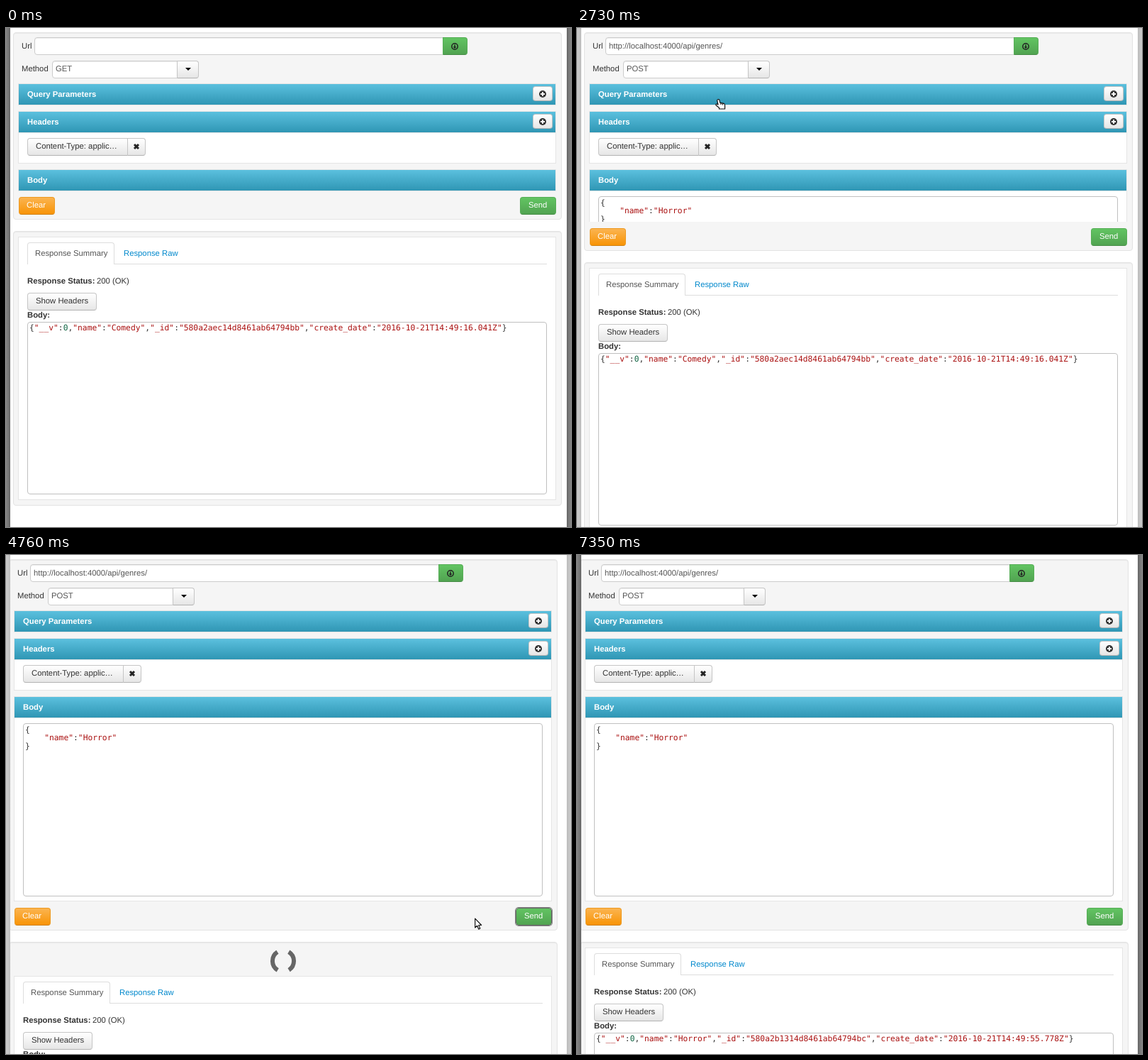
An HTML page for the animation above (7.49 s loop, 797 by 703 pixels).

```html
<!DOCTYPE html>
<html lang="en">
<head>
<meta charset="utf-8">
<title>REST client</title>
<style>
html, body { margin: 0; width: 100%; height: 100%; overflow: hidden; background: #fff; }
#stage { position: relative; width: 797px; height: 703px; overflow: hidden;
  font: 11.3px/20px "Liberation Sans", Arial, sans-serif; color: #333; text-rendering: geometricPrecision; }
#stage * { box-sizing: border-box; }
#stage div, #stage svg { position: absolute; white-space: pre; }
#stage svg { overflow: visible; }
.side { background: linear-gradient(90deg, #ccc, #bdbdbd); }
.side.right { transform: scaleX(-1); }
.dark .side { background: linear-gradient(90deg, #858585, #686868); }
.panel { background: #f5f5f5; border: 1px solid #e3e3e3; border-radius: 4px; box-shadow: inset 0 1px 1px rgba(0,0,0,.05); }
.card { background: #fff; border: 1px solid #e5e5e5; }
.bar { background: linear-gradient(#5bc0de, #2f96b4); }
.field { background: #fff; border: 1px solid #ccc; border-radius: 4px 0 0 4px; box-shadow: inset 0 1px 1px rgba(0,0,0,.075); }
.field.focus { border-color: rgba(82,168,236,.8); box-shadow: inset 0 1px 1px rgba(0,0,0,.075), 0 0 6px rgba(82,168,236,.6); }
.code { background: #fff; border: 1px solid #c0c0c0; border-radius: 4px; }
.btn { background: linear-gradient(#fff, #e6e6e6); border: 1px solid #c5c5c5; border-bottom-color: #b3b3b3; border-radius: 4px; }
.green { background: linear-gradient(#62c462, #51a351); border-color: #56ae56 #56ae56 #458c45; }
.orange { background: linear-gradient(#fbb450, #f89406); border-color: #ee9a22 #ee9a22 #d08010; }
.btn.hover { background: #e6e6e6; }
.green.hover { background: #51a351; }
.btn.ring { border-color: #666; box-shadow: 0 0 0 1px rgba(70,70,70,.65); }
.l { border-radius: 4px 0 0 4px; }
.r { border-radius: 0 4px 4px 0; }
.b { font-weight: bold; }
.w { color: #fff; }
.in { color: #555; }
.link { color: #08c; }
.tab { background: #fff; border: 1px solid #ddd; border-bottom: 0; border-radius: 4px 4px 0 0; }
.rule { background: #ddd; }
.clip { overflow: hidden; }
.menu { background: #fff; border: 1px solid rgba(0,0,0,.2); border-radius: 0 0 4px 4px; box-shadow: 0 5px 10px rgba(0,0,0,.2); }
.pick { background: linear-gradient(#08c, #0077b3); }
.mono { font: 11.3px/11.3px "DejaVu Sans Mono", monospace; }
.mono i { font-style: normal; color: #a11; }
.mono b { font-weight: normal; color: #164; }
</style>
</head>
<body>
<div id="stage"></div>
<script>
const LOOP = 7490, STEP = 70;
const URL_TEXT = 'http://localhost:4000/api/genres/';
const METHODS = ['GET', 'POST', 'PUT', 'DELETE'];
const stage = document.getElementById('stage');

function box(parent, x, y, w, h, cls = '') {
  const el = document.createElement('div');
  el.className = cls;
  el.style.cssText = `left:${x}px;top:${y}px;width:${w}px;height:${h}px`;
  parent.append(el);
  return el;
}

// y is the middle of the capitals
function text(parent, x, y, str, cls = '') {
  const el = document.createElement('div');
  el.className = cls;
  el.style.cssText = `left:${x}px;top:${y - 10}px`;
  el.textContent = str;
  parent.append(el);
  return el;
}

function icon(parent, x, y, shapes) {
  parent.insertAdjacentHTML('beforeend',
    `<svg width="1" height="1" style="left:${x}px;top:${y}px">${shapes}</svg>`);
  return parent.lastElementChild;
}

const paint = src => src.replace(/"[^"]*"|\b\d+\b/g,
  m => m[0] === '"' ? `<i>${m}</i>` : `<b>${m}</b>`);

function code(parent, x, y, src) {
  const el = box(parent, x, y, 720, 40, 'mono');
  el.innerHTML = paint(src);
  return el;
}

const reply = (name, id, time) =>
  `{"__v":0,"name":"${name}","_id":"${id}","create_date":"2016-10-21T14:49:${time}Z"}`;
const OLD = paint(reply('Comedy', '580a2aec14d8461ab64794bb', '16.041'));
const NEW = paint(reply('Horror', '580a2b1314d8461ab64794bc', '55.778'));

// page, with the dimmed page behind showing at both sides
const page = box(stage, 0, 0, 797, 703);
box(stage, 0, 0, 6, 703, 'side');
box(stage, 791, 0, 6, 703, 'side right');

// request form
const form = box(page, 10, 6, 774, 264, 'panel');
text(page, 22, 26, 'Url');
const urlBox = box(page, 40, 13, 577, 25, 'field');
const url = text(page, 45, 26, '', 'in');
box(page, 616, 13, 35, 25, 'btn green r');
icon(page, 633, 26, '<circle r="4.2" fill="none" stroke="#222" stroke-width="1.5"/><path d="M0-2.4V2M-1.5.5L0 2 1.5.5" fill="none" stroke="#222" stroke-width="1.4"/>');
text(page, 22, 58, 'Method');
box(page, 65, 46, 177, 25, 'field');
const method = text(page, 70, 58, 'GET', 'in');
const drop = box(page, 241, 46, 31, 25, 'btn r');
icon(page, 256.5, 56, '<path d="M-4 0H4L0 4Z" fill="#000"/>');

function section(y, title, plus) {
  box(page, 17, y - 1, 759, 31, 'card');
  box(page, 18, y, 757, 29, 'bar');
  text(page, 30, y + 15, title, 'b w');
  if (!plus) return;
  box(page, 743, y + 3, 28, 21, 'btn');
  icon(page, 757, y + 13.5, '<circle r="5" fill="#333"/><path d="M-3 0H3M0-3V3" stroke="#fff" stroke-width="2"/>');
}
section(79, 'Query Parameters', true);
section(118, 'Headers', true);
section(200, 'Body', false);
box(page, 17, 147, 759, 44, 'card');
box(page, 30, 155, 142, 25, 'btn l');
text(page, 42, 167, 'Content-Type: applic…');
box(page, 171, 155, 26, 25, 'btn r');
icon(page, 184, 167, '<path d="M-3-3L3 3M3-3L-3 3" stroke="#222" stroke-width="3"/>');

const fold = box(page, 17, 229, 759, 0, 'clip');
const foldIn = box(fold, 0, 0, 759, 259, 'card');
box(foldIn, 12, 7, 733, 244, 'code');
code(foldIn, 15, 11, '{\n    "name":"Horror"\n}');

// response
const low = box(page, 0, 0, 797, 703);
box(low, 18, 238, 51, 25, 'btn orange');
text(low, 29, 250, 'Clear', 'w');
const send = box(low, 725, 238, 51, 25, 'btn green');
text(low, 737, 250, 'Send', 'w');
const panel = box(low, 10, 286, 774, 387, 'panel');
const wait = box(low, 17, 294, 759, 0, 'clip');
const spin = icon(wait, 380, 19, '<g fill="none" stroke="#666" stroke-width="6"><path d="M-13 7.5A15 15 0 0 1-1-15"/><path d="M13-7.5A15 15 0 0 1 1 15"/></g>').firstChild;
const res = box(low, 0, 0, 797, 703);
box(res, 17, 294, 759, 371, 'card');
box(res, 30, 332, 733, 1, 'rule');
box(res, 30, 302, 123, 31, 'tab');
text(res, 41, 318, 'Response Summary', 'in');
text(res, 166, 318, 'Response Raw', 'link');
text(res, 30, 357, 'Response Status:', 'b');
text(res, 128, 357, '200 (OK)');
box(res, 30, 373, 98, 25, 'btn');
text(res, 42, 385, 'Show Headers');
text(res, 30, 405, 'Body:', 'b');
box(res, 30, 414, 733, 243, 'code');
const out = code(res, 33, 417, '');

// method list
const menu = box(page, 65, 72, 219, 90, 'menu');
const pick = box(menu, 0, 0, 206, 21, 'pick');
const items = METHODS.map((m, i) => text(menu, 18, 12.5 + i * 20.9, m));
icon(menu, 212, 5, '<path d="M-3 3H3L0 0Z" fill="#888"/>');
icon(menu, 212, 81, '<path d="M-3 0H3L0 3Z" fill="#888"/>');

// pointers
const pointer = (d, more) => icon(stage, 0, 0, `<path d="${d}" ${more}/>`);
const solid = 'fill="#fff" stroke="#111" stroke-width="1.2" stroke-linejoin="round"';
const pointers = {
  arrow: pointer('M.7.7V13.5L3.6 10.8 5.7 15.6 7.8 14.7 5.7 10H9.6Z', solid),
  hand: pointer('M3.5.8C5 .2 6 1 6.2 2.5L6.7 5.2 12 6.3Q13.8 7 13.6 9V14H5.5V12.3L1.2 9Q.3 7.2 2 7L4 8 2.8 2.5Q2.6 1.2 3.5.8ZM8 5.6V8M10.5 6V8.4', solid),
  beam: pointer('M1 .7H3Q4 .7 4 2 4 .7 5 .7H7M4 2V15M1 16.3H3Q4 16.3 4 15 4 16.3 5 16.3H7', 'fill="none" stroke="#111" stroke-width="1.2"')
};

// time, x, y, shape until the next entry
const PATH = [
  [140, 18, 12, 'arrow'], [280, 55, 19, 'beam'], [350, 69, 20, 'beam'],
  [560, 69, 20, 'beam'], [1260, 134, 19, 'beam'], [1330, 142, 30, 'arrow'],
  [1470, 190, 69, 'arrow'], [1680, 253, 57, 'hand'], [1890, 253, 57, 'hand'],
  [2030, 240, 82, 'hand'], [2240, 195, 100, 'hand'], [2730, 195, 100, 'hand'],
  [2870, 250, 150, 'arrow'], [3360, 507, 281, 'arrow'], [3430, 530, 308, 'arrow'],
  [3990, 727, 507, 'hand'], [4410, 727, 507, 'hand'], [4480, 717, 508, 'arrow'],
  [5040, 605, 515, 'arrow'], [5740, 605, 515, 'arrow'], [5810, 604, 514, 'arrow'],
  [6160, 604, 514, 'arrow'], [6440, 740, 330, 'arrow'], [6650, 690, 140, 'arrow'],
  [6930, 419, 10, 'arrow'], [7070, 410, 2, 'arrow'], [7140, 408, -24, 'arrow']
];

// the standard CSS "ease" curve
function ease(u) {
  if (u <= 0) return 0;
  if (u >= 1) return 1;
  let lo = 0, hi = 1;
  for (let i = 0; i < 24; i++) {
    const s = (lo + hi) / 2;
    if (.75 * s * (1 - s) + s ** 3 < u) lo = s; else hi = s;
  }
  const r = 1 - lo;
  return .3 * r * r * lo + 3 * r * lo * lo + lo ** 3;
}

function movePointer(t) {
  let shape = '', x = 0, y = 0;
  const i = PATH.findLastIndex(k => k[0] <= t);
  if (i >= 0 && i < PATH.length - 1) {
    const [a, b] = [PATH[i], PATH[i + 1]];
    const u = (t - a[0]) / (b[0] - a[0]);
    x = a[1] + (b[1] - a[1]) * u;
    y = a[2] + (b[2] - a[2]) * u;
    shape = a[3];
  }
  for (const key in pointers) {
    pointers[key].style.display = key === shape ? '' : 'none';
    pointers[key].style.transform = `translate(${x}px,${y}px)`;
  }
}

const toggle = (el, cls, on) => el.classList.toggle(cls, on);

function draw(t) {
  const within = (a, b) => t >= a && t < b;
  toggle(stage, 'dark', !within(560, 7350));
  page.style.left = t >= 2800 ? '-6px' : '0';

  toggle(urlBox, 'focus', within(560, 2380));
  url.textContent = URL_TEXT.slice(0, Math.max(0, 3 * ((t - 560) / STEP + 1)));
  method.textContent = t >= 2380 ? 'POST' : 'GET';
  toggle(drop, 'hover', within(1680, 2030));
  toggle(drop, 'ring', within(1820, 2520));

  menu.style.display = within(1820, 2380) ? '' : 'none';
  const row = t < 2030 ? -1 : t < 2170 ? 0 : 1;
  pick.style.display = row < 0 ? 'none' : '';
  pick.style.top = 2 + row * 20.9 + 'px';
  items.forEach((el, i) => toggle(el, 'w', i === row));

  const open = 259 * ease((t - 2680) / 350);
  fold.style.height = open + 'px';
  form.style.height = 264 + open + 'px';
  low.style.top = open + 'px';

  toggle(send, 'hover', within(3990, 4480));
  toggle(send, 'ring', within(4130, 7350));

  const gap = 40 * (ease((t - 4281) / 350) - ease((t - 4755) / 350));
  wait.style.height = gap + 'px';
  res.style.top = gap + 'px';
  panel.style.height = 387 + gap + 'px';
  spin.setAttribute('transform', `rotate(${(t - 4340) * .36})`);
  out.innerHTML = t >= 4340 ? NEW : OLD;
  movePointer(t);
}

const start = performance.now();
function tick(now) {
  const t = Math.max(0, now - start) % LOOP;
  draw(Math.floor(t / STEP) * STEP);
  requestAnimationFrame(tick);
}
draw(0);
requestAnimationFrame(tick);
</script>
</body>
</html>
```
